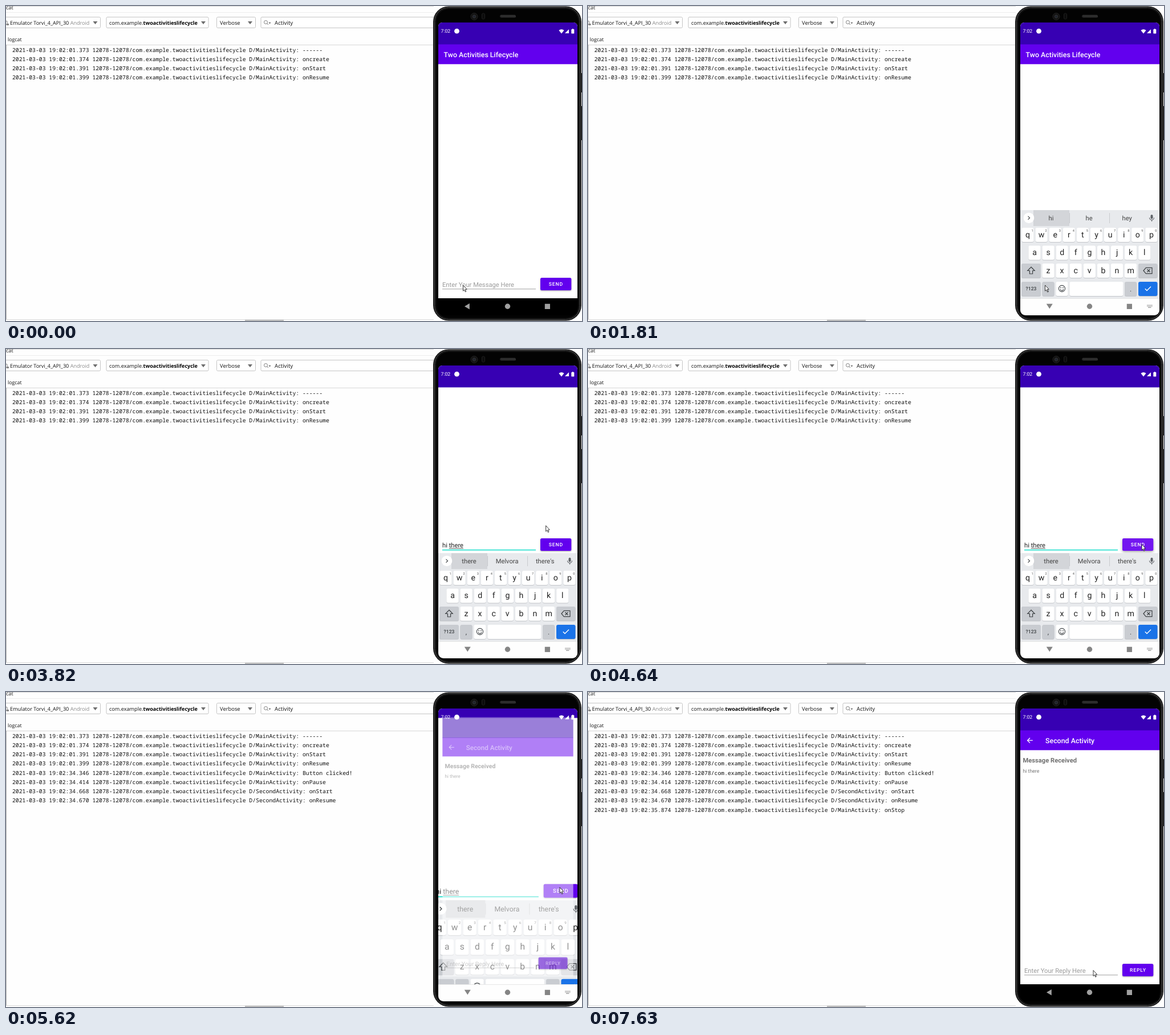
Animation of 1010 by 554 pixels, one loop 8000 ms. Source, as an HTML page with a canvas:

```html
<!DOCTYPE html>
<html lang="en">
<head>
<meta charset="utf-8">
<title>Activity lifecycle</title>
<style>
html, body { margin: 0; width: 100%; height: 100%; overflow: hidden; background: #fff; }
canvas { display: block; }
</style>
</head>
<body>
<canvas id="stage" width="1010" height="554"></canvas>
<script>
const ctx = document.getElementById('stage').getContext('2d');
const LOOP = 8000;
const UI = '"Open Sans", "Noto Sans", sans-serif';
const MONO = '"Noto Sans Mono", "DejaVu Sans Mono", monospace';
const APP = 'Roboto, sans-serif';
const PURPLE = '#6200ee', DARK = '#3700b3', TEAL = '#03dac5';
const SCREEN = { x: 758, y: 29, w: 244, h: 515 };

const LOG = [
  [0, '01.373', 'Main', '------'],
  [0, '01.374', 'Main', 'oncreate'],
  [0, '01.391', 'Main', 'onStart'],
  [0, '01.399', 'Main', 'onResume'],
  [4790, '34.346', 'Main', 'Button clicked!'],
  [4790, '34.414', 'Main', 'onPause'],
  [5100, '34.668', 'Second', 'onStart'],
  [5100, '34.670', 'Second', 'onResume'],
  [6200, '35.874', 'Main', 'onStop']
];

// Value of the last [time, value] entry that has begun.
function at(t, list) {
  let v = list[0][1];
  for (const [start, value] of list) if (t >= start) v = value;
  return v;
}

// Progress 0..1 in n hard steps, the first at t0 and the last at t1.
function stepped(t, t0, t1, n) {
  if (t < t0) return 0;
  return Math.min(n, 1 + Math.floor((t - t0) / (t1 - t0) * (n - 1) + 0.001)) / n;
}

function bezier(p, u) {
  const v = 1 - u;
  return [0, 1].map(i =>
    p[0][i] * v ** 3 + 3 * p[1][i] * v * v * u + 3 * p[2][i] * v * u * u + p[3][i] * u ** 3);
}

function text(s, x, y, size, color, family = APP, weight = 400, align = 'left', spacing = 0) {
  ctx.font = `${weight} ${size}px ${family}`;
  ctx.textRendering = 'geometricPrecision';
  ctx.letterSpacing = spacing + 'px';
  ctx.textAlign = align;
  ctx.fillStyle = color;
  ctx.fillText(s, x, y);
  return ctx.measureText(s).width;
}

function rect(x, y, w, h, color) {
  ctx.fillStyle = color;
  ctx.fillRect(x, y, w, h);
}

function round(x, y, w, h, r, fill, stroke, width = 1) {
  ctx.beginPath();
  ctx.roundRect(x, y, w, h, r);
  if (fill) { ctx.fillStyle = fill; ctx.fill(); }
  if (stroke) { ctx.strokeStyle = stroke; ctx.lineWidth = width; ctx.stroke(); }
}

function circle(x, y, r, fill, stroke, width = 1) {
  ctx.beginPath();
  ctx.arc(x, y, r, 0, Math.PI * 2);
  if (fill) { ctx.fillStyle = fill; ctx.fill(); }
  if (stroke) { ctx.strokeStyle = stroke; ctx.lineWidth = width; ctx.stroke(); }
}

function trace(points, closed) {
  ctx.beginPath();
  points.forEach(([x, y]) => ctx.lineTo(x, y));
  if (closed) ctx.closePath();
}

function shape(points, color) {
  trace(points, true);
  ctx.fillStyle = color;
  ctx.fill();
}

function line(points, color, width = 1, closed = false) {
  trace(points, closed);
  ctx.strokeStyle = color;
  ctx.lineWidth = width;
  ctx.stroke();
}

function drop(x, y, half = 4) {
  shape([[x - half, y - half * 0.6], [x + half, y - half * 0.6], [x, y + half * 0.7]], '#6e6e6e');
}

function drawLogcat(t) {
  rect(0, 0, 1010, 554, '#fefefe');
  text('cat', 0, 5.5, 9.1, '#222', UI);
  rect(0, 11, 750, 1, '#ececec');
  rect(0, 0, 750, 1, '#d8d8d8');

  const border = '#c4c4c4';
  round(-6.5, 19.5, 172, 19, 2, '#fff', border);
  round(176, 19.5, 179, 19, 2, '#fff', border);
  round(369.5, 19.5, 68, 19, 2, '#fff', border);
  round(447, 19.5, 320, 19, 2, '#fff', border);
  [156.5, 346, 428].forEach(x => drop(x, 29.5));
  round(-3, 26.5, 5, 6, 1, null, '#777');
  rect(1, 31, 4, 3, '#888');

  const w = text('Emulator Torvi_4_API_30 ', 7, 33, 9.1, '#111', UI);
  text('Android', 7 + w, 33, 9.1, '#8a8a8a', UI);
  const p = text('com.example.', 181, 33, 9.15, '#111', UI);
  text('twoactivitieslifecycle', 181 + p, 33, 9.05, '#000', UI, 700);
  text('Verbose', 375, 33, 9.4, '#111', UI);
  text('Activity', 471, 33, 9.7, '#111', UI);
  circle(455.5, 28.5, 3, null, '#777');
  line([[457.7, 30.7], [460, 33]], '#777');
  drop(462.5, 30, 2);

  text('logcat', 3, 62, 8.8, '#111', UI);
  rect(0, 68, 750, 1, '#d6d6d6');
  rect(0, 68, 1, 484, '#b4b4b4');
  rect(0, 551, 750, 1, '#dadada');
  rect(419, 552, 68, 2, '#bdbdbd');

  LOG.forEach(([start, sec, who, what], i) => {
    if (t < start) return;
    text(`2021-03-03 19:02:${sec} 12078-12078/com.example.twoactivitieslifecycle D/${who}Activity: ${what}`,
      11, Math.round(80.6 + i * 16.25), 9.755, '#111', MONO);
  });
}

function drawPhone() {
  rect(1007, 118, 3, 34, '#2a2a2a');
  rect(1007, 176, 3, 60, '#2a2a2a');
  round(749, 0.5, 260, 553, 27, '#161616');
  round(751.5, 2.5, 255, 549, 25, '#050505', '#555', 1);
  round(753.5, 4.5, 251, 545, 23, '#030303', '#1d1d1d', 1);
  circle(821, 18.5, 6, '#111', '#242424');
  circle(821, 18.5, 2.8, '#20242c', '#333');
  round(834.5, 13, 5, 10, 2, '#0c0c0c', '#1e1e1e');
  round(866, 15.5, 28, 5, 2.5, '#242424');
  for (let x = 868; x < 893; x += 2) {
    rect(x, 16.5, 1, 1, '#4a4a4a');
    rect(x + 1, 18.5, 1, 1, '#444');
  }
}

function drawButton(label, pressed) {
  ctx.save();
  ctx.shadowColor = 'rgba(0,0,0,.35)';
  ctx.shadowBlur = pressed ? 5 : 2.5;
  ctx.shadowOffsetY = pressed ? 2 : 1;
  round(937, 478, 54.3, 22, 2.5, pressed ? '#7316f0' : PURPLE);
  ctx.restore();
  text(label, 964.4, 492.3, 8.7, '#fff', APP, 500, 'center', 0.78);
}

function drawField(hint, typed, focused, caret) {
  if (!typed) text(hint, 765, 494, 11.2, '#9b9b9b');
  const w = typed ? text(typed, 765, 494, 11.2, '#222') : 0;
  if (typed.includes(' ')) {
    const skip = ctx.measureText('hi ').width;
    rect(765 + skip, 495.4, w - skip, 0.8, '#333');
  }
  if (focused) rect(765, 497.8, 164, 1.4, TEAL);
  else rect(765, 497.4, 164, 0.8, '#888');
  if (caret) rect(765 + w, 482, 1.3, 16, TEAL);
}

function drawPage(title, titleX, pan, body) {
  rect(SCREEN.x, SCREEN.y, SCREEN.w, 485, '#fff');
  ctx.save();
  ctx.translate(0, -pan);
  rect(SCREEN.x, 67, SCREEN.w, 35.3, PURPLE);
  text(title, titleX, 90, 12.4, '#fff', APP, 500);
  body();
  ctx.restore();
  rect(SCREEN.x, SCREEN.y, SCREEN.w, 38.5, DARK);
}

function drawKey(x, y, w, color) {
  round(x, y - 11, w, 25, 3, '#c3c6ca');
  round(x, y - 12, w, 25, 3, color);
}

function drawRow(letters, x0, y, numbered) {
  [...letters].forEach((ch, i) => {
    const x = x0 + i * 24.1;
    drawKey(x - 10.6, y, 21.2, '#fff');
    text(ch, x, y + 4.6, 14.2, '#222', APP, 400, 'center');
    if (numbered) text((i + 1) % 10, x + 8, y - 5, 5.6, '#555', APP, 400, 'center');
  });
}

function drawKeyboard(t) {
  const gray = '#c9ccd1', ink = '#3c4043';
  rect(SCREEN.x, 359, SCREEN.w, 155, '#e8eaed');
  rect(781, 359, 63, 28, '#d3d5d9');
  circle(773, 372.7, 9.3, '#fff');
  line([[771.5, 369.7], [774.5, 372.7], [771.5, 375.7]], ink, 1.2);
  rect(844, 364, 1, 18, '#c8cacd');
  rect(914, 364, 1, 18, '#c8cacd');
  const words = at(t, [[0, ['hi', 'he', 'hey']], [2210, ['the', 'to', 'that']],
    [2450, ['the', 'there', 'they']], [2600, ['there', 'the', 'they']],
    [2870, ['there', 'Melvora', "there's"]]]);
  words.forEach((s, i) => text(s, 812 + i * 66.6, 377, 11.2, '#444', APP, 400, 'center'));
  round(986.5, 367, 4, 7.5, 2, '#5f6368');
  ctx.beginPath();
  ctx.arc(988.5, 372.3, 4, 0, Math.PI);
  ctx.strokeStyle = '#5f6368';
  ctx.lineWidth = 1.1;
  ctx.stroke();
  rect(988, 376, 1.1, 3, '#5f6368');

  drawRow('qwertyuiop', 771, 402, true);
  drawRow('asdfghjkl', 783, 433.5);
  drawRow('zxcvbnm', 807, 465);
  drawKey(760, 465, 34, gray);
  drawKey(965, 465, 33.5, gray);
  line([[777, 459], [783.2, 465.5], [779.6, 465.5], [779.6, 471], [774.4, 471], [774.4, 465.5], [770.8, 465.5]], ink, 1.2, true);
  line([[974, 465.5], [978.3, 460.3], [989, 460.3], [989, 470.7], [978.3, 470.7]], ink, 1.2, true);
  line([[980.5, 463], [985.5, 468]], ink, 1.2);
  line([[985.5, 463], [980.5, 468]], ink, 1.2);

  drawKey(760, 497, 34, gray);
  text('?123', 777, 500.3, 8.6, ink, APP, 500, 'center');
  drawKey(796.4, 497, 21.2, gray);
  text(',', 807, 501.5, 12, ink, APP, 400, 'center');
  drawKey(820.4, 497, 21.2, '#fff');
  circle(831, 497, 5.6, null, ink, 1.1);
  circle(829, 495.4, 0.9, ink);
  circle(833, 495.4, 0.9, ink);
  ctx.beginPath();
  ctx.arc(831, 497.6, 2.9, 0.2, Math.PI - 0.2);
  ctx.stroke();
  drawKey(844.4, 497, 94, '#fff');
  drawKey(941, 497, 21.2, gray);
  text('.', 951.6, 501.5, 12, ink, APP, 400, 'center');
  drawKey(965, 497, 33.5, '#1a73e8');
  line([[976.8, 497.2], [980, 500.4], [987, 493.4]], '#fff', 1.4);
}

function drawMain(t) {
  const pan = at(t, [[0, 0], [2210, 90], [2330, 145]]);
  const typed = at(t, [[0, ''], [1300, 'h'], [1540, 'hi'], [2210, 'hi t'],
    [2330, 'hi th'], [2450, 'hi the'], [2600, 'hi there']]);
  const caret = at(t, [[0, false], [280, true], [3420, false], [3830, true], [4250, false]]);
  drawPage('Two Activities Lifecycle', 767.5, pan, () => {
    drawField('Enter Your Message Here', typed, t >= 280, caret);
    drawButton('SEND', t >= 4520 && t < 4790);
  });
  if (t >= 1540) drawKeyboard(t);
}

function drawSecond() {
  drawPage('Second Activity', 802, 0, () => {
    line([[779.8, 85.2], [770.8, 85.2]], '#fff', 1.3);
    line([[775, 80.8], [770.6, 85.2], [775, 89.6]], '#fff', 1.3);
    text('Message Received', 762.5, 124, 11.2, '#707070', APP, 700);
    text('hi there', 762.5, 142, 8.7, '#757575');
    drawField('Enter Your Reply Here', '', false, false);
    drawButton('REPLY', false);
  });
}

function zoomed(scale, alpha, draw) {
  if (!alpha) return;
  ctx.save();
  ctx.globalAlpha = alpha;
  ctx.translate(880, 286.5);
  ctx.scale(scale, scale);
  ctx.translate(-880, -286.5);
  draw();
  ctx.restore();
}

function drawStatus() {
  text('7:02', 762.5, 47.3, 8.7, '#fff');
  circle(790.5, 44.2, 4.4, '#fff');
  ctx.beginPath();
  ctx.moveTo(974, 48.4);
  ctx.arc(974, 48.4, 7.2, -Math.PI * 0.72, -Math.PI * 0.28);
  ctx.closePath();
  ctx.fillStyle = '#fff';
  ctx.fill();
  shape([[980, 48], [987, 48], [987, 41]], '#fff');
  round(991.3, 41, 5, 7.4, 0.6, '#fff');
  rect(992.8, 40, 2, 1.2, '#fff');
}

function drawNav(t) {
  const back = at(t, [[0, '#000'], [900, '#808080'], [1180, '#fefefe'], [5770, '#000']]);
  const color = at(t, [[0, '#a0a0a0'], [900, '#b8b8b8'], [1180, '#d0d0d0'],
    [1540, '#929292'], [1810, '#858585'], [5770, '#a0a0a0']]);
  const typing = t >= 430 && t < 5770;
  rect(SCREEN.x, 514, SCREEN.w, 30, back);
  if (t >= 1180 && t < 5770) rect(SCREEN.x, 514, SCREEN.w, 1, '#e6e6e6');
  shape(typing ? [[803.8, 523.8], [814.8, 523.8], [809.3, 532.6]]
    : [[812.8, 523], [812.8, 533.4], [804, 528.2]], color);
  circle(879.5, 528.3, 4.7, color);
  rect(944.8, 523.8, 9.2, 9.2, color);
  if (typing) {
    for (let y = 0; y < 2; y++)
      for (let x = 0; x < 5; x++) rect(980.3 + x * 2, 525.5 + y * 2, 1.2, 1.2, color);
    rect(982, 529.6, 5.4, 1.1, color);
  }
}

function drawScreen(t) {
  ctx.save();
  ctx.beginPath();
  ctx.roundRect(SCREEN.x, SCREEN.y, SCREEN.w, SCREEN.h, [7, 7, 9, 9]);
  ctx.clip();
  ctx.save();
  ctx.beginPath();
  ctx.rect(SCREEN.x, SCREEN.y, SCREEN.w, 485);
  ctx.clip();
  const [exit, enter, alpha] = at(t, [[0, [1, 0.85, 0]], [5500, [1.008, 0.85, 0]],
    [5620, [1.1, 0.94, 0.5]], [5770, [1.14, 0.99, 1]], [5920, [1.15, 1, 1]]]);
  if (t < 5920) zoomed(exit, 1, () => drawMain(t));
  zoomed(enter, alpha, drawSecond);
  ctx.restore();
  drawStatus();
  drawNav(t);
  ctx.restore();
}

function drawPointer(t) {
  const ease = u => u * u * (3 - 2 * u);
  let [x, y] = bezier([[801, 490.5], [850, 400], [940, 240], [970.5, 343]],
    ease(stepped(t, 3150, 3970, 7)));
  if (t >= 6480) {
    const u = ease(stepped(t, 6480, 7490, 8));
    x = 970.5 - 85 * u;
    y = 343 + 144 * u;
  }
  if (t >= 7630) y = 489;
  const arrow = [[0, 0], [0, 10.6], [2.5, 8.4], [4.2, 12.3], [5.9, 11.5], [4.2, 7.8], [7.4, 7.6]]
    .map(([dx, dy]) => [x + 0.5 + dx * 0.9, y + 0.5 + dy * 0.96]);
  shape(arrow, '#fff');
  line(arrow, '#222', 0.9, true);
}

function frame(now) {
  const t = now % LOOP;
  drawLogcat(t);
  drawPhone();
  drawScreen(t);
  drawPointer(t);
  requestAnimationFrame(frame);
}
frame(performance.now());
</script>
</body>
</html>
```
